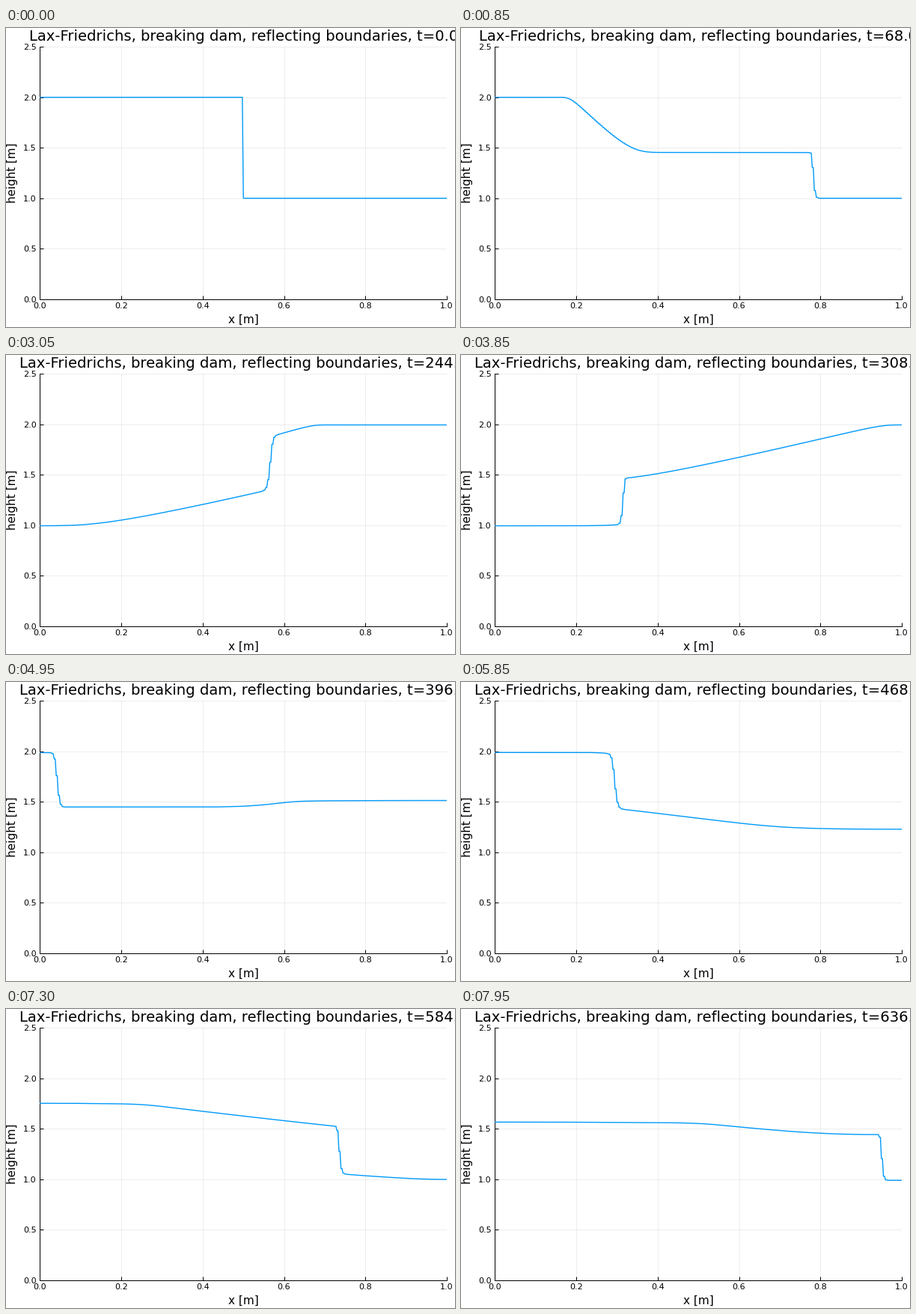
A matplotlib script for the animation above (8000 ms loop, 600x400 px).

```python
import numpy as np
import matplotlib.pyplot as plt
from matplotlib.animation import FuncAnimation

W, H, DPI = 600, 400, 100
FRAMES, INTERVAL = 160, 50
LEFT, RIGHT, TOP, BOTTOM = 45.4, 589.0, 25.2, 362.8   # axes box, px from top left
G, CELLS = 9.81, 400
DX, DT, SUBSTEPS = 1 / CELLS, 0.0005, 8
T_STEP = 4.0


def lax_friedrichs(h, q):
    """One step of the shallow water equations between two walls."""
    h = np.pad(h, 1, mode="edge")
    q = np.concatenate(([-q[0]], q, [-q[-1]]))
    flux = q * q / h + 0.5 * G * h * h
    r = DT / (2 * DX)
    h_new = 0.5 * (h[2:] + h[:-2]) - r * (q[2:] - q[:-2])
    q_new = 0.5 * (q[2:] + q[:-2]) - r * (flux[2:] - flux[:-2])
    return h_new, q_new


def simulate():
    i = np.arange(CELLS + 1)
    h, q = np.where(i < CELLS // 2, 2.0, 1.0), np.zeros(CELLS + 1)
    states = []
    for _ in range(FRAMES):
        states.append(h)
        for _ in range(SUBSTEPS):
            h, q = lax_friedrichs(h, q)
    return i * DX, states


x, heights = simulate()

plt.rcParams["font.family"] = "DejaVu Sans"
fig = plt.figure(figsize=(W / DPI, H / DPI), dpi=DPI, facecolor="white")
ax = fig.add_axes([LEFT / W, 1 - BOTTOM / H, (RIGHT - LEFT) / W, (BOTTOM - TOP) / H])
ax.set(xlim=(0, 1), ylim=(0, 2.5))
ax.set_xticks(np.linspace(0, 1, 6))
ax.set_yticks(np.linspace(0, 2.5, 6))
ax.tick_params(direction="in", length=3.6, width=0.72, pad=3.3, labelsize=8)
ax.tick_params(axis="y", pad=3.6)
ax.xaxis.set_major_formatter("{x:.1f}")
ax.yaxis.set_major_formatter("{x:.1f}")
ax.grid(color="black", alpha=0.1, linewidth=0.5)
ax.set_axisbelow(True)
for side in ("top", "right"):
    ax.spines[side].set_visible(False)
for side in ("left", "bottom"):
    ax.spines[side].set_linewidth(0.72)


def label(px, py, text, size, **kw):
    return fig.text(px / W, 1 - py / H, text, size=size, ha="center", **kw)


mid_x, mid_y = (LEFT + RIGHT) / 2, (TOP + BOTTOM) / 2
title = label(mid_x, 17, "", 14.1, va="baseline")
label(mid_x, 394.5, "x [m]", 11, va="baseline")
label(8.5, mid_y, "height [m]", 11, va="center", rotation=90)
line, = ax.plot([], [], color="#009AFA", linewidth=1, zorder=3)


def update(k):
    line.set_data(x, heights[k])
    title.set_text("Lax-Friedrichs, breaking dam, reflecting boundaries, "
                   f"t={k * T_STEP:.1f}")
    return line, title


anim = FuncAnimation(fig, update, frames=FRAMES, interval=INTERVAL,
                     repeat=True, repeat_delay=0)
plt.show()
```
